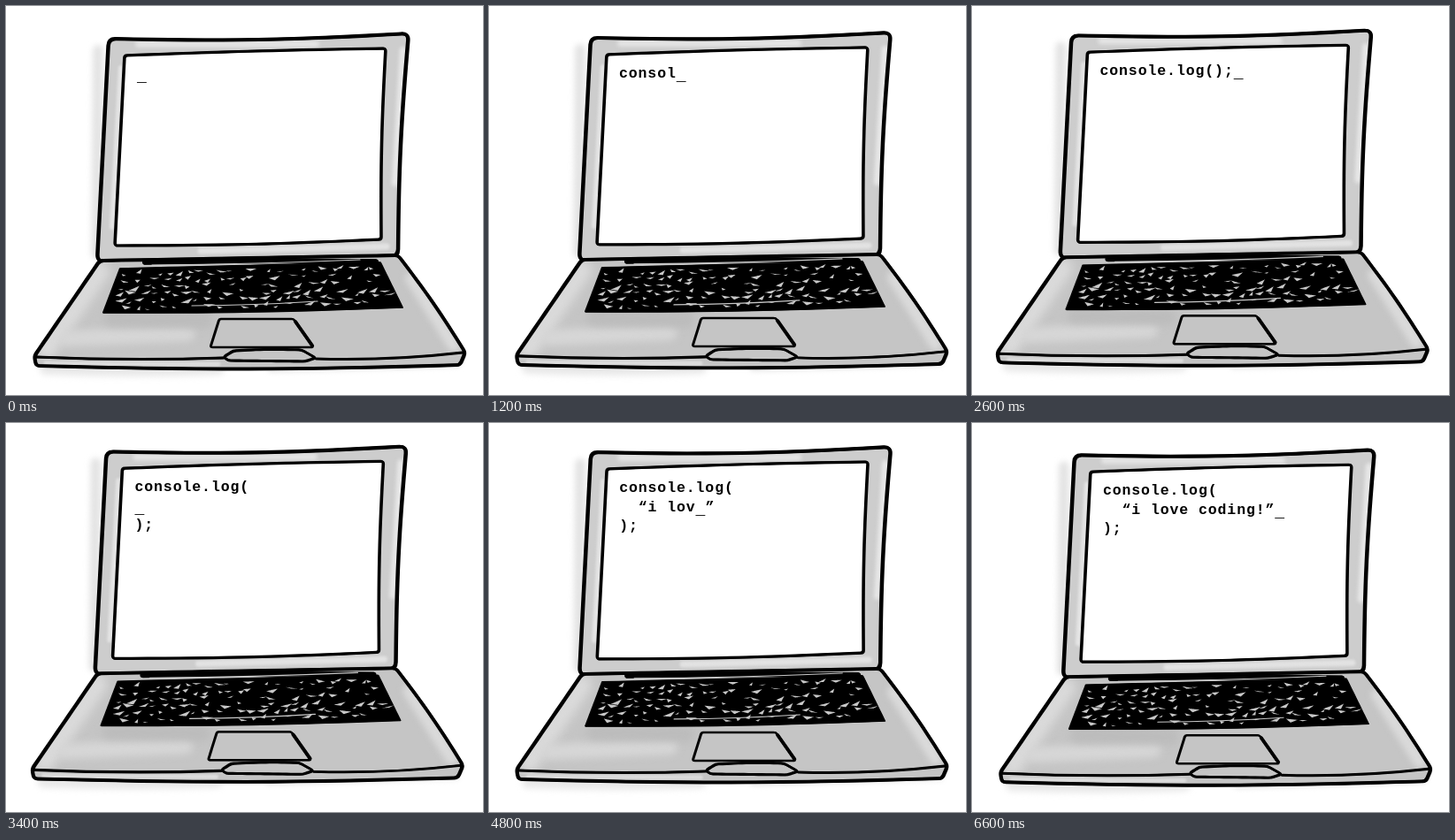
Write an HTML page with a canvas that moves like this. It is 539 by 440 pixels and loops after 6.8 s.

```html
<!DOCTYPE html>
<html lang="en">
<head>
<meta charset="utf-8">
<title>Typing laptop</title>
<style>
  html, body { margin: 0; width: 100%; height: 100%; overflow: hidden; background: #fff; }
  canvas { position: absolute; left: 0; top: 0; width: 539px; height: 440px; }
  pre {
    position: absolute; left: 148px; top: 67px; margin: 0; color: #000;
    font: bold 16.5px/21.5px "Liberation Mono", "Courier New", monospace;
    letter-spacing: .9px;
  }
  .cursor { position: relative; top: 3px; font-size: 18px; line-height: 0; letter-spacing: 0; }
</style>
</head>
<body>
<canvas></canvas>
<pre></pre>
<script>
const W = 539, H = 440, STEP = 200, STEPS = 34;
const canvas = document.querySelector('canvas');
const code = document.querySelector('pre');
const ctx = canvas.getContext('2d');
const ratio = window.devicePixelRatio || 1;
canvas.width = W * ratio;
canvas.height = H * ratio;

// The cursor walks back through the call and opens it over three lines
const editing = [
  'console.log()_', 'console.log();_', 'console.log()_;', 'console.log(_);',
  'console.log(\n_);', 'console.log(\n_\n);', 'console.log(\n  _\n);', 'console.log(\n  “_”\n);'
];

function textAt(i) {
  if (i < 12) return 'console.log'.slice(0, i) + '_';
  if (i < 20) return editing[i - 12];
  const typed = 'i love coding!'.slice(0, i - 19);
  return `console.log(\n  “${typed}${i === STEPS - 1 ? '”_' : '_”'}\n);`;
}

// Slow sway of the whole picture
function swayAt(i) {
  const dx = -Math.sin(Math.PI * i / 34) - 2.6 * Math.exp(-(((i - 13) / 5.5) ** 2));
  const dy = -4.8 * Math.sin(Math.PI * i / 38) ** 2;
  return i ? [dx, dy] : [0, 0];
}

function seeded(seed) {
  return () => (seed = (seed * 16807) % 2147483647) / 2147483647;
}

// Corners are [x, y, bow of the edge that follows]
function panel(corners, r = 0) {
  const path = new Path2D();
  let first;
  corners.forEach(([x, y, bow = 0], i) => {
    const [u, v] = corners[(i + 1) % corners.length];
    const len = Math.hypot(u - x, v - y);
    for (let k = 0; k <= 16; k++) {
      const t = (r + (len - 2 * r) * k / 16) / len;
      const s = bow * Math.sin(Math.PI * t) / len;
      const p = [x + (u - x) * t - (v - y) * s, y + (v - y) * t + (u - x) * s];
      first = first || p;
      if (i && !k) path.quadraticCurveTo(x, y, ...p);
      else path.lineTo(...p);
    }
  });
  path.quadraticCurveTo(...corners[0].slice(0, 2), ...first);
  path.closePath();
  return path;
}

function fill(path, color) {
  ctx.fillStyle = color;
  ctx.fill(path);
}

// Two slightly shifted strokes give a line that swells with direction
function ink(path, width) {
  ctx.strokeStyle = '#000';
  for (const shift of [-.4, .4]) {
    ctx.save();
    ctx.translate(shift, shift / 2);
    ctx.lineWidth = width - .7;
    ctx.stroke(path);
    ctx.restore();
  }
}

function curve(x, y, u, v, bow = 0) {
  const path = new Path2D();
  path.moveTo(x, y);
  path.quadraticCurveTo((x + u) / 2, (y + v) / 2 + 2 * bow, u, v);
  return path;
}

// Soft stroke of marker
function wash(color, width, ...ends) {
  ctx.filter = `blur(${width * ratio / 4}px)`;
  ctx.strokeStyle = color;
  ctx.lineWidth = width;
  ctx.stroke(curve(...ends));
  ctx.filter = 'none';
}

function inside(path, paint) {
  ctx.save();
  ctx.clip(path);
  paint();
  ctx.restore();
}

const lid = panel([[116, 37, 4], [455, 31, 3], [443, 283], [103, 289]], 8);
const screen = panel([[134, 56, -1], [429, 48, 2], [424, 264, -2], [123, 271]], 3);
const base = panel([[106, 288], [443, 282, -2], [519, 392], [513, 406, -4], [34, 407], [32, 396]], 4);
const keys = panel([[129, 297], [423, 290], [448, 341, -2], [110, 347]]);
const pad = panel([[241, 354], [325, 354], [347, 386], [231, 386]], 2);
const latch = panel([[257, 390, -1], [334, 389], [350, 398], [338, 402], [251, 401], [246, 397]], 3);

function body() {
  wash('#e4e4e4', 12, 104, 50, 102, 280);
  wash('#e8e8e8', 14, 45, 410, 240, 410, 2);
  wash('#ececec', 10, 300, 410, 510, 404);

  fill(lid, '#cdcdcd');
  inside(lid, () => {
    wash('#e4e4e4', 8, 150, 43, 350, 43);
    wash('#e4e4e4', 6, 130, 70, 120, 250);
    wash('#e8e8e8', 8, 449, 50, 440, 200);
    wash('#e2e2e2', 7, 220, 277, 430, 272);
  });
  ink(lid, 4.4);
  fill(screen, '#fff');
  ink(screen, 3.5);

  fill(base, '#c5c5c5');
  inside(base, () => {
    wash('#dadada', 22, 106, 300, 46, 388);
    wash('#d6d6d6', 18, 70, 376, 205, 370);
    wash('#dadada', 14, 458, 308, 506, 384);
    wash('#bcbcbc', 18, 120, 354, 225, 356);
    wash('#dcdcdc', 5, 45, 404, 240, 405);
  });
  ink(base, 4.2);
}

function keyboard() {
  const rnd = seeded(417), rows = 6, cols = 25;
  fill(keys, '#000');
  ink(keys, 2);
  ink(curve(157, 290, 418, 289, -1), 6);
  for (let n = 0; n < rows * cols; n++) {
    const u = (n % cols + .3 + rnd() * .6) / cols;
    const v = (Math.floor(n / cols) + .3 + rnd() * .6) / rows;
    const x = 132 - 17 * v + u * (286 + 42 * v);
    const y = 298 + 47 * v - u * 6;
    const w = 2 + rnd() * 5, h = .6 + rnd() * 2.4, lean = (rnd() - .5) * 4;
    if (rnd() < .25) continue;
    fill(panel([[x - w, y + lean], [x + w, y - lean - h / 2], [x + lean, y + h]]), '#c8c8c8');
  }
  ctx.strokeStyle = '#c8c8c8';
  ctx.lineWidth = 1.2;
  ctx.stroke(curve(210, 339, 352, 334, 1));
  ctx.stroke(curve(165, 293, 400, 287, 1));
}

function front() {
  ink(curve(34, 397, 246, 398, 2), 3.4);
  ink(curve(350, 399, 516, 392, 3), 3.2);
  ink(pad, 2.8);
  ink(curve(327, 357, 346, 384), 4.2);
  fill(latch, '#c5c5c5');
  ink(latch, 3.4);
}

function draw(i) {
  const [dx, dy] = swayAt(i);
  ctx.setTransform(ratio, 0, 0, ratio, 0, 0);
  ctx.clearRect(0, 0, W, H);
  ctx.translate(dx, dy);
  ctx.lineCap = ctx.lineJoin = 'round';
  body();
  keyboard();
  front();
  code.innerHTML = textAt(i).replace('_', '<span class="cursor">_</span>');
  code.style.transform = `translate(${dx}px, ${dy}px)`;
}

let shown = -1;
function tick() {
  const i = Math.floor(performance.now() / STEP) % STEPS;
  if (i !== shown) draw(shown = i);
  requestAnimationFrame(tick);
}
tick();
</script>
</body>
</html>
```
